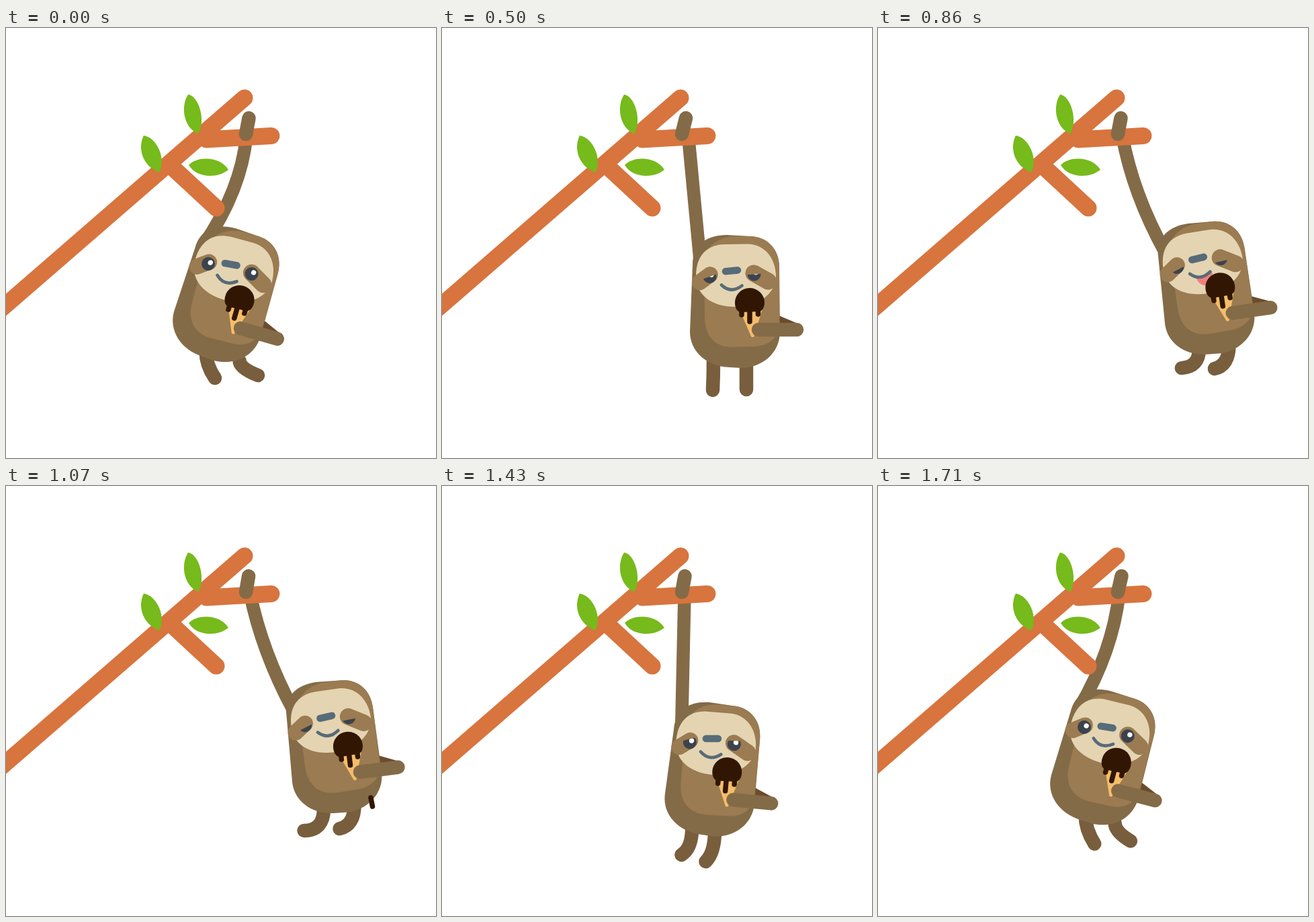
Animation of 640x640 px, one loop 1780 ms. Source, as an HTML page with a canvas:

```html
<!DOCTYPE html>
<html lang="en">
<head>
<meta charset="utf-8">
<title>Swinging sloth</title>
<style>
  html, body { margin: 0; height: 100%; overflow: hidden; background: #fff; }
  canvas { display: block; width: 100vmin; height: 100vmin; }
</style>
</head>
<body>
<canvas width="640" height="640"></canvas>
<script>
const ctx = document.querySelector('canvas').getContext('2d');
const LOOP = 1780, FPS = 14, RAD = Math.PI / 180;

const C = {
  branch: '#d8743e', leaf: '#76ba1b', fur: '#846b47', light: '#9b7b51',
  leg: '#785e3d', shade: '#6b4c2d', face: '#e4d4b2', eye: '#3c434d',
  nose: '#576b78', tongue: '#f17f7f', choc: '#311703', cone: '#f5bc6b'
};

// time, elbow x, elbow y, body angle
const BODY = [
  [0, 349, 447, 16], [290, 376, 454, 10], [430, 444, 456, 3], [500, 471, 449, 0],
  [570, 479, 450, -1], [640, 489, 446, -2.6], [860, 528, 424, -8], [980, 534, 421, -8.6],
  [1140, 519, 431, -5.8], [1210, 513, 435, -5], [1430, 433, 467, 5.5], [1710, 358, 454, 14.5]
];

// time, hand tip x, wrist x, arm bow, eyelid, left hip x, foot x, y, right hip x, foot x, y
const POSE = [
  [0, 361.5, 358, 24, -12, -40, -38, 74, 12, 26, 70],
  [290, 360.5, 360, 18, -4, -45, -41, 80, 7, 18, 72],
  [500, 363, 366.5, 0, 0, -67, -68, 90, -18, -18, 89],
  [860, 361.5, 363.5, -16, 4, -57, -76, 82, -12, -27, 83],
  [1210, 361, 363, -12, 1.5, -62, -86, 90, -17, -33, 86],
  [1430, 361.5, 361, 0, -5, -57, -77, 82, -23, -41, 92],
  [1710, 362.5, 359, 20, -12, -38, -35, 79, 7, 18, 75]
];

const TONGUE = [[0, 0], [640, 0], [860, 1], [960, 1], [1140, 0]];

// Periodic monotone cubic interpolation of every column
function sample(keys, t) {
  const n = keys.length;
  const key = i => {
    const turn = Math.floor(i / n), [time, ...values] = keys[i - turn * n];
    return [time + turn * LOOP, ...values];
  };
  let i = n - 1;
  while (keys[i][0] > t) i--;
  const [a, b, c, d] = [i - 1, i, i + 1, i + 2].map(key);
  const span = c[0] - b[0], u = (t - b[0]) / span;
  const rate = (p, q, j) => (q[j] - p[j]) / (q[0] - p[0]);
  const slope = (r, s) => r * s > 0 ? 2 * r * s / (r + s) : 0;
  return b.slice(1).map((from, k) => {
    const j = k + 1, mid = rate(b, c, j);
    const m0 = slope(rate(a, b, j), mid) * span, m1 = slope(mid, rate(c, d, j)) * span;
    const delta = c[j] - from;
    return from + u * (m0 + u * (3 * delta - 2 * m0 - m1 + u * (m0 + m1 - 2 * delta)));
  });
}

function fill(color, path) {
  ctx.fillStyle = color;
  ctx.fill(new Path2D(path));
}

function stroke(color, width, path) {
  ctx.strokeStyle = color;
  ctx.lineWidth = width;
  ctx.stroke(new Path2D(path));
}

function disc(color, x, y, r) {
  ctx.fillStyle = color;
  ctx.beginPath();
  ctx.arc(x, y, r, 0, 7);
  ctx.fill();
}

function tree() {
  stroke(C.branch, 25, 'M-20,429.4L355,104M298,166L395,160.5M245,205L313,268');
  fill(C.leaf, 'M271,99C259,118 265,149 286,157.5C298,138 287,101 271,99Z');
  fill(C.leaf, 'M205,160C195,180 204,206 228,215C239,196 225,163 205,160Z');
  fill(C.leaf, 'M272,204C285,190 319,191 331,211C315,224 284,224 272,204Z');
}

function leg(hipX, hipY, x, y) {
  const bend = 0.5 + Math.max(0, hipX - x) / 60;
  stroke(C.leg, 20.5, `M${hipX},${hipY}Q${hipX},${hipY + bend * (y - hipY)} ${x},${y}`);
}

function eye(x, y, angle, lid) {
  ctx.save();
  ctx.translate(x, y);
  ctx.rotate(angle * RAD);
  ctx.beginPath();
  ctx.rect(-20, lid, 40, 40);
  ctx.clip();
  ctx.rotate(-angle * RAD);
  disc(C.eye, 0, 0, 10);
  disc('#fff', 2.5, -2.7, 3.7);
  ctx.restore();
}

function head(lid, tongue) {
  fill(C.face, 'M378,369C378,340 393,323 420,322L455,321.5C482,322 497,345 497,370C497,395 470,415 437,415C402,415 378,398 378,369Z');
  stroke(C.light, 23.5, 'M383.5,378.5L399,367');
  stroke(C.light, 25, 'M464,365L485.5,377');
  eye(398.5, 370, -20, lid);
  eye(464.5, 366.5, -4, lid);
  stroke(C.nose, 10.5, 'M422,362.3L440,360.5');
  if (tongue > 0) {
    ctx.save();
    ctx.translate(436, 386);
    ctx.scale(tongue, tongue);
    fill(C.tongue, 'M-12,1Q0,5 13,-2C16,14 10,18 2,17C-6,16 -11,10 -12,1Z');
    ctx.restore();
  }
  stroke(C.nose, 4.7, 'M416,382.5Q430,396 446.5,383.5');
}

function iceCream() {
  fill(C.cone, 'M441,415L478,415L464,460L460.5,460Z');
  fill(C.choc, 'M436,409A22,21.5 0 0 1 480,408C480,416 477,422 470,422L446,423C439,423 436,416 436,409Z');
  stroke(C.choc, 7.5, 'M446,418V427M458,418V437M470.5,418V426');
}

// A drop of chocolate flung off while swinging
function drop(t) {
  const age = t - 930, fall = 230 * (age / 284) ** 2;
  if (age <= 0 || fall > 300) return;
  const x = 530 + 26 * age / 284, y = 407 + fall;
  stroke(C.choc, 7.5, `M${x},${y}l2.5,13`);
}

function draw(t) {
  const [x, y, angle] = sample(BODY, t);
  const [tipX, wristX, bow, lid, hipL, footLX, footLY, hipR, footRX, footRY] = sample(POSE, t);
  const [tongue] = sample(TONGUE, t);
  const cos = Math.cos(angle * RAD), sin = Math.sin(angle * RAD);
  const place = (dx, dy) => [x + dx * cos - dy * sin, y + dx * sin + dy * cos];

  ctx.fillStyle = '#fff';
  ctx.fillRect(0, 0, 640, 640);
  ctx.lineCap = 'round';

  const [shoulderX, shoulderY] = place(-87, -104);
  const bowX = (wristX + shoulderX) / 2 + bow, bowY = (160 + shoulderY) / 2;
  stroke(C.fur, 19.5, `M${wristX},160Q${bowX},${bowY} ${shoulderX},${shoulderY}`);
  tree();
  stroke(C.fur, 20.5, `M357,158L${tipX},134`);

  leg(...place(hipL, 47), x + footLX, y + footLY);
  leg(...place(hipR, 47), x + footRX, y + footRY);

  ctx.save();
  ctx.translate(x, y);
  ctx.rotate(angle * RAD);
  ctx.translate(-471, -449);
  stroke(C.shade, 18, 'M495,435L528,449');
  fill(C.fur, 'M373,352C373,322 395,308 424,308L460,310C485,311 502,330 502,355L503,452C503,485 475,506 445,506L428,505C395,504 369,482 369,452Z');
  fill(C.light, 'M391,430C391,460 408,475 432,475L465,474C490,473 502,457 502,440L502,355C501,330 485,311 460,310L437,310C412,311 398,322 390,340Z');
  head(lid, tongue);
  iceCream();
  ctx.restore();

  drop(t);
  const [elbowX, elbowY] = place(57, 0);
  stroke(C.fur, 20.5, `M${x},${y}L${elbowX},${elbowY}`);
}

const start = performance.now();
function tick(now) {
  const t = Math.max(0, now - start) % LOOP;
  draw(Math.floor((t + 5) * FPS / 1000) * 1000 / FPS % LOOP);
  requestAnimationFrame(tick);
}
requestAnimationFrame(tick);
</script>
</body>
</html>
```
